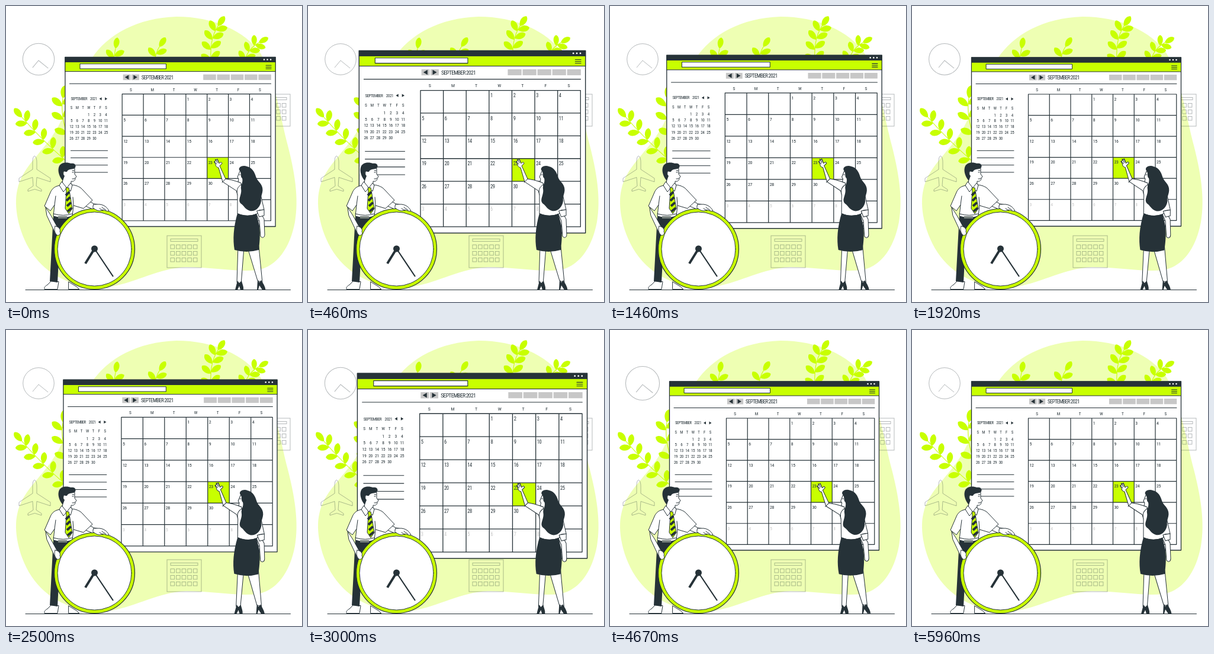
An HTML page for the animation above (6000 ms loop, 500 px wide and 500 px high).

```html
<!DOCTYPE html>
<html lang="en">
<head>
<meta charset="utf-8">
<title>Calendar</title>
<style>
  html, body { margin: 0; width: 100%; height: 100%; overflow: hidden; background: #fff; }
  svg { display: block; width: 100%; height: 100%; }
  text {
    font-family: 'Roboto Condensed', 'Liberation Sans Narrow', 'Noto Sans', 'Open Sans', sans-serif;
    font-stretch: 62.5%; fill: #263238;
  }
  .line { fill: none; stroke: #263238; stroke-linecap: round; stroke-linejoin: round; }
  .skin { fill: #fff; stroke: #263238; stroke-linecap: round; stroke-linejoin: round; }
  .dark { fill: #263238; }
  .lime { fill: #c8ff00; }
  .grey { fill: #c7c7c7; }
  .faint { fill: none; stroke: #263238; stroke-opacity: .34; }
  .stem { fill: none; stroke: #c8ff00; stroke-width: 1.1; }
</style>
</head>
<body>
<svg viewBox="0 0 500 500" xmlns="http://www.w3.org/2000/svg">
  <path fill="#eeffb3" d="M145 88C172 48 222 20 288 18C350 18 404 42 430 80C452 118 460 170 474 228C488 280 495 325 488 365C480 408 458 440 425 446C390 450 350 441 304 441C258 443 222 466 178 474C126 481 72 460 43 416C20 381 13 337 19 311C27 268 68 246 93 194C120 160 127 118 145 88Z"/>
  <g id="leaves" class="lime"></g>

  <g id="dial" class="faint">
    <circle cx="55" cy="90" r="26.3"/>
    <path d="M45 104L55 92L71 105"/>
  </g>
  <path class="faint" d="M48 253.5C50.500 253.5 52 258 52 264V276L75 291V297L52 289.5L51 304L60 310V313L48.500 309.5L37 313V310L46 304L45 289.5L22 297V291L45 276V264C45 258 46 253.5 48 253.5Z"/>
  <g id="icons" class="faint"></g>

  <g id="window">
    <rect x="100.5" y="87" width="354" height="285" class="skin" stroke-width="1.3"/>
    <rect x="100.5" y="95" width="354" height="16" class="lime" stroke="#263238"/>
    <rect x="100" y="86.5" width="355" height="9" class="dark"/>
    <rect x="125.5" y="98.3" width="145" height="8.2" class="skin"/>
    <path stroke="#fff" stroke-width="2.6" stroke-linecap="round" stroke-dasharray="0 5.5" d="M435.500 91H447"/>
    <path class="line" d="M438.500 100.8H447.500M438.500 103.6H447.500M438.500 106.4H447.500"/>
    <g id="buttons"></g>
    <path class="line" d="M108 131.5H447"/>
    <g id="notes" class="line"></g>
    <g id="sheet"></g>
  </g>

  <path class="line" d="M33 479.5H480.500"/>

  <g id="man">
    <path class="skin" d="M76 465L70 471C66 473 64 476 65 478.5H87L89 466ZM106 466L119 474L124 478.5H106Z"/>
    <path class="dark" d="M80 354H112V380L90 410L87 467L74 465Z"/>
    <path class="skin" d="M67 340L76 354L87 374L84 386L69 354Z"/>
    <path class="skin" d="M127 322L148 334L158 336L164 348L146 343L125 334Z"/>
    <path class="skin" d="M92 303C83 304 78 308 75 315L65 338L75 346L82 336L80 355Q96 360 112 355L114 337L131 342L146 328L130 311C125 305 119 303 111 302Z"/>
    <path class="line" d="M82 336L84 321M114 337L113 323M80 351Q97 356 112 351"/>
    <path class="skin" d="M96 290L95 302L103 311L110 302L110 296C115 297 117 294 117 291L119 288L116 284L116 274L98 275Z"/>
    <path class="dark" d="M96 295C91 290 87 280 89 273C91 264 102 263 110 266C116 265 119 269 117 273C113 277 105 274 103 280L100 280C96 278 95 283 99 287Z"/>
    <path class="line" d="M112 281H114M112 278H115M112 292Q114 293 116 291"/>
    <path class="skin" d="M94 297L90 303L97 314L103 307L109 313L112 303L109 299L103 307Z"/>
    <path class="lime" stroke="#263238" d="M101 307H106L107 312L112 342L106 351L100 342L102 312Z"/>
    <g id="stripes" stroke="#263238" stroke-width="4"></g>
    <rect x="88" y="355" width="15" height="4" fill="#77817d"/>
  </g>

  <g id="clock">
    <circle cx="149.5" cy="410.5" r="68" class="lime" stroke="#263238" stroke-width="1.2"/>
    <circle cx="149.5" cy="410.5" r="62.5" class="skin"/>
    <path d="M149.500 410L181 457" stroke="#263238" stroke-width="2.2"/>
    <path d="M149.500 410L134 435" stroke="#263238" stroke-width="4"/>
    <circle cx="149.5" cy="410" r="5.5" class="dark"/>
  </g>
  <path class="skin" d="M148 335H158C167 336 171 341 174 346C169 348 165 343 162 345C157 348 151 344 147 341Z"/>
  <path class="line" d="M162 340L169 345M158 342L164 346"/>
  <path class="skin" d="M83 372C88 372 93 377 91 381C93 384 90 389 86 387C82 383 81 377 83 372Z"/>

  <g id="woman">
    <path class="skin" d="M392 405L390 467L397 471L402 408ZM408 408L425 464L433 467L427 406Z"/>
    <path class="dark" d="M391 464L387 479.5H391L394 473L396 479.5H401C402 475 399 469 398 464L394 468ZM425 463L424 479.5H426L428 472L433 479.5H438.500C438 474 434 468 431 463L428 467Z"/>
    <path class="skin" d="M425 340L436 360L437 386C437 391 433 393 430 389L428 363L420 345Z"/>
    <path class="skin" d="M398 299L382 294L371 292L361 270L365 266C364 262 361 265 360 266L357 258.5L355 260L353.500 259L354 262L351.500 263L354 267C354 271 357 273 359 273L366 297L389 312L392 322Z"/>
    <path class="line" d="M357 265L355 260M356 267L352 263M359 264L357 259M371 292L365 298"/>
    <path class="skin" d="M398 301C391 306 389 310 391 319V351Q408 358 424 351L427 345L436 344L430 318L420 304Z"/>
    <path class="skin" d="M424 346L436 344V354L428 356Z"/>
    <path class="skin" d="M395 279L391 289L393 292L392 297L397 299L398 306L410 305V280Z"/>
    <path class="line" d="M394 285H396"/>
    <path class="dark" d="M394 277C392 272 400 268 407 271C416 273 420 281 422 288C424 296 434 300 433.500 311C433 319 430 321 431 329C430 340 421 348 412 346C403 343 402 337 397 334C390 328 399 319 397 309C396 303 401 298 399 291C395 288 399 283 394 277Z"/>
    <path class="dark" d="M391 350Q407 357 423 351L428 371C430 388 428 402 427 412Q406 418 386 412C383 394 384 375 391 350Z"/>
  </g>
</svg>
<script>
const $ = id => document.getElementById(id);
const repeat = (n, make) => Array.from({ length: n }, (_, i) => make(i)).join('');
const rect = (x, y, w, h, extra = '') => `<rect x="${x}" y="${y}" width="${w}" height="${h}" ${extra}/>`;
const label = (x, y, size, str, extra = '') =>
  `<text x="${x}" y="${y}" font-size="${size}" letter-spacing="${-size * 0.06}" ${extra}>${str}</text>`;
const MID = 'text-anchor="middle"';

function leaf(x, y, angle, len) {
  const w = len * 0.34;
  return `<path transform="translate(${x} ${y}) rotate(${angle})"
    d="M0 0C${len * 0.3} ${-w} ${len * 0.85} ${-w} ${len} 0C${len * 0.85} ${w} ${len * 0.3} ${w} 0 0Z"/>`;
}

// A curved stem with staggered pairs of leaves and one leaf at the tip.
function branch([x0, y0], [cx, cy], [x1, y1], pairs, len = 20) {
  const at = (a, b, c, s) => a * (1 - s) ** 2 + 2 * b * s * (1 - s) + c * s * s;
  const slope = (a, b, c, s) => (b - a) * (1 - s) + (c - b) * s;
  const grow = (s, turn) => leaf(at(x0, cx, x1, s), at(y0, cy, y1, s),
    Math.atan2(slope(y0, cy, y1, s), slope(x0, cx, x1, s)) * 180 / Math.PI + turn, len);
  return `<path class="stem" d="M${x0} ${y0}Q${cx} ${cy} ${x1} ${y1}"/>` + grow(1, 0) +
    repeat(pairs, i => grow((i + 0.35) / pairs, -52) + grow((i + 0.5) / pairs, 52));
}
$('leaves').innerHTML =
  branch([104, 264], [60, 226], [27, 188], 5) +
  branch([106, 225], [91, 185], [96, 156], 3, 22) +
  branch([180, 98], [183, 84], [185, 72], 1, 19) +
  branch([250, 98], [253, 78], [259, 69], 1, 19) +
  branch([347, 100], [342, 58], [358, 34], 4) +
  branch([402, 96], [408, 72], [427, 62], 3, 18);

function calendarIcon(x, y) {
  return rect(x, y, 58, 54) + rect(x + 6, y + 5.5, 46, 4) +
    repeat(15, i => rect(x + 6 + i % 5 * 9.6, y + 15.5 + Math.floor(i / 5) * 11, 6.5, 6.5));
}
$('icons').innerHTML = calendarIcon(422, 149) + calendarIcon(272, 388);

const arrow = (x, y, w) => `<path class="dark" d="M${x} ${y - Math.abs(w) * 0.6}V${y + Math.abs(w) * 0.6}L${x + w} ${y}Z"/>`;
$('buttons').innerHTML =
  repeat(2, i => rect(198 + i * 14.3, 116, 12.8, 9.5, 'class="grey"')) +
  repeat(5, i => rect(333 + i * 23.2, 116, 21.5, 9.3, 'class="grey"')) +
  arrow(207.5, 120.7, -6.5) + arrow(215.5, 120.7, 6.5) + arrow(162, 157, -4) + arrow(167.5, 157, 4);
$('notes').innerHTML = repeat(4, i => `<path d="M110 ${244.3 + i * 12.2}h62"/>`);
$('stripes').innerHTML = repeat(4, i => `<path d="M${101 + i} ${320 + i * 9}l${6 + i * 0.4} -6"/>`);

function sheet() {
  const left = 196.5, top = 149, colW = 35.75, rowH = 35.55;
  const right = left + 7 * colW, bottom = top + 6 * rowH;
  const grid = repeat(8, i => `M${left + i * colW} ${top}V${bottom}`) +
    repeat(7, i => `M${left} ${top + i * rowH}H${right}`);
  const miniX = col => 111 + col * 9.7;
  let out = rect(left + 4 * colW, top + 3 * rowH, colW, rowH, 'class="lime"') +
    `<path class="line" stroke-width="1.2" d="${grid}"/>` +
    label(229, 124.3, 9, 'SEPTEMBER 2021', 'style="letter-spacing:-.75px"') +
    label(110, 159.3, 6.6, 'SEPTEMBER', 'style="letter-spacing:-.55px"') +
    label(154, 159.3, 6.6, '2021', 'text-anchor="end"');
  [...'SMTWTFS'].forEach((name, i) => {
    out += label(211 + i * 36.2, 144, 7.3, name, MID) + label(miniX(i), 174.6, 6.8, name, MID);
  });
  for (let cell = 3; cell < 42; cell++) {
    const col = cell % 7, row = Math.floor(cell / 7), day = cell - 2, next = day > 30;
    const str = day === 31 ? 'OCT 1' : next ? day - 30 : day;
    out += label(left + 2 + col * colW, top + 10.8 + row * rowH, 7.8, str, next ? 'style="fill:#c7c7c7"' : '');
    if (!next) out += label(miniX(col), 186.5 + row * 9.8, 7, day, MID);
  }
  return out;
}
$('sheet').innerHTML = sheet();

const LOOP = 6000, LEAD = 20, REST = 1000;

// Two linear pulses, peaking at 10% and 50% of the cycle.
function beat(p) {
  const first = p < 0.1 ? p / 0.1 : 1 - (p - 0.1) / 0.2;
  const second = 1 - Math.abs(p - 0.5) / 0.1;
  return 1 + 0.1 * Math.max(0, first, second);
}
// Triangle wave: 0, 1, 0, -1, 0.
const sway = p => Math.asin(Math.sin(p * 2 * Math.PI)) * 2 / Math.PI;
const scaleAt = (x, y, s) => `translate(${x} ${y}) scale(${s}) translate(${-x} ${-y})`;

function draw() {
  const t = (performance.now() + LEAD) % LOOP;
  $('window').setAttribute('transform', scaleAt(277.5, 229.5, beat(t / LOOP)));
  $('dial').setAttribute('transform', scaleAt(55, 90, beat(t % 1500 / 1500)));
  $('woman').setAttribute('transform', `rotate(${sway(Math.max(0, t - REST) / (LOOP - REST))} 395 370)`);
  requestAnimationFrame(draw);
}
draw();
</script>
</body>
</html>
```
